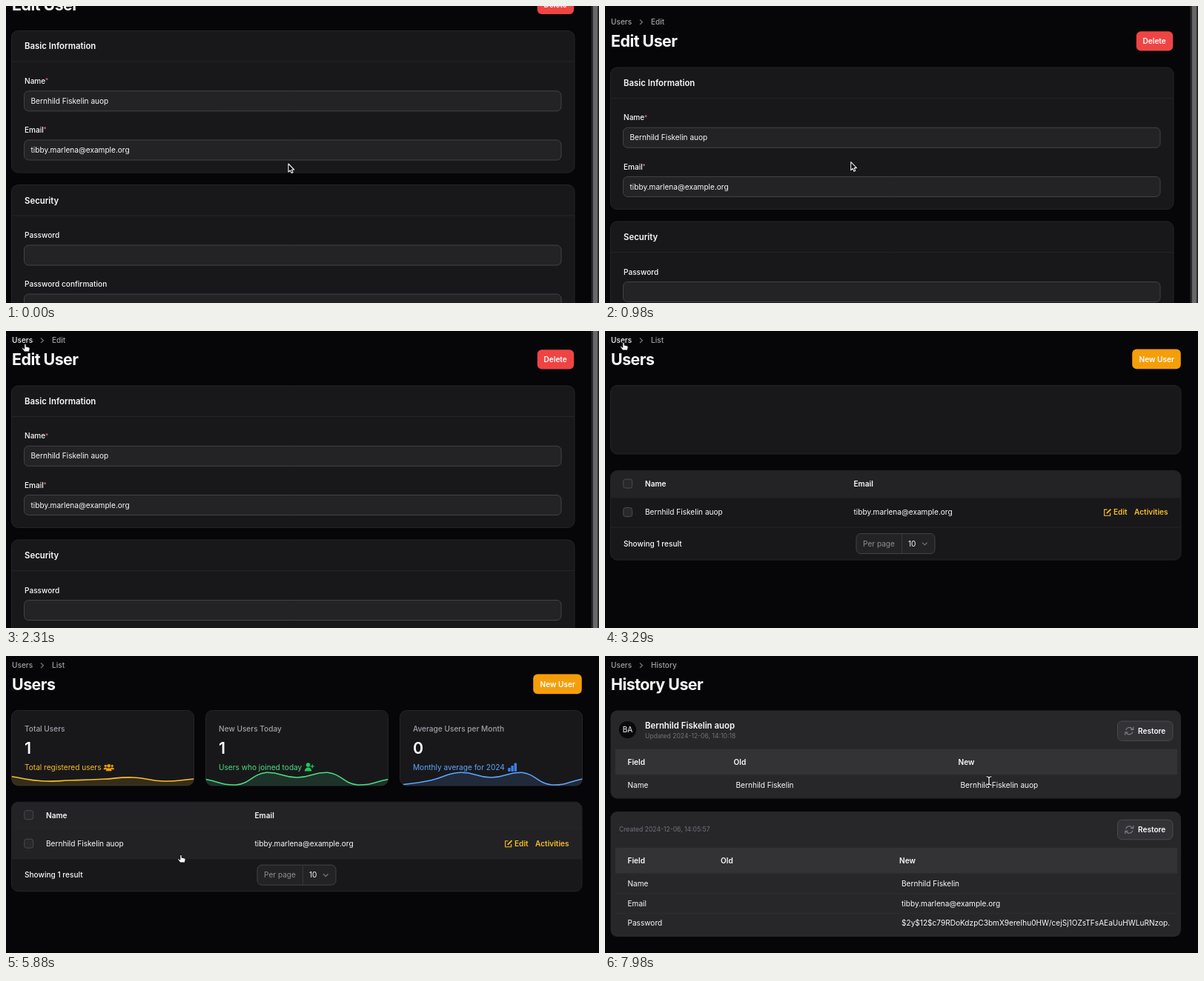
Write an HTML page with a canvas that moves like this. It is 800 px wide and 401 px high and loops after 8 s.

```html
<!DOCTYPE html>
<html lang="en">
<head>
<meta charset="utf-8">
<title>User admin</title>
<style>
html, body { margin: 0; height: 100%; overflow: hidden; background: #060608; }
canvas { display: block; width: 800px; height: 401px; }
</style>
</head>
<body>
<canvas id="stage"></canvas>
<script>
const LOOP = 8000, STEP = 70;
const LIST_AT = 3290, STATS_AT = 3360, HISTORY_AT = 7490;
const FULL = 'Bernhild Fiskelin auop', SHORT = 'Bernhild Fiskelin';
const MAIL = 'tibby.marlena@example.org';
const HASH = '$2y$12$c79RDoKdzpC3bmX9ereIhu0HW/cejSj1OZsTFsAEaUuHWLuRNzop.';
const WHITE = '#fafafa', MUTED = '#a1a1aa', DIM = '#71717a', AMBER = '#fbbf24';
const BG = '#060608', CARD = '#18181b', RAISED = '#232326', EDGE = '#252529';

const canvas = document.getElementById('stage');
const c = canvas.getContext('2d');
const dpr = window.devicePixelRatio || 1;
canvas.width = 800 * dpr;
canvas.height = 401 * dpr;

const smooth = u => u * u * (3 - 2 * u);
const easeOut = u => 1 - (1 - u) ** 4;
const clamp = (v, lo, hi) => Math.min(hi, Math.max(lo, v));

// Interpolates rows of [time, ...values]
function track(keys, t) {
  const i = keys.findIndex(k => k[0] > t);
  if (i < 0) return keys[keys.length - 1].slice(1);
  const a = keys[i - 1], b = keys[i];
  const u = smooth((t - a[0]) / (b[0] - a[0]));
  return a.slice(1).map((v, n) => v + (b[n + 1] - v) * u);
}

const POINTER = [
  [0, 381, 213], [490, 381, 213], [700, 376, 224], [1190, 303, 202], [1330, 300, 200],
  [1470, 300, 200], [2310, 26, 17], [2380, 25, 16], [2520, 25, 16], [2800, 27, 17],
  [2940, 25, 15], [4060, 25, 15], [4550, 556, 278], [4900, 600, 284], [5180, 604, 283],
  [5880, 236, 268], [6020, 230, 264], [6510, 245, 260], [6580, 245, 260],
  [7350, 736, 253], [7420, 736, 253], [7980, 518, 168.5]
];
const SCROLL = [
  [0, -40.5], [350, -36], [490, -36], [700, 22.5], [1190, 0.2], [1330, 0]
];

function text(s, x, y, color = WHITE, weight = 400, size = 10.1, spacing = 0) {
  c.font = `${weight} ${size}px Inter, sans-serif`;
  c.letterSpacing = spacing + 'px';
  c.fillStyle = color;
  c.fillText(s, x, y + size * 0.364);
}

function box(x0, y0, x1, y1, r, fill, stroke) {
  c.beginPath();
  c.roundRect(x0, y0, x1 - x0, y1 - y0, r);
  if (fill) { c.fillStyle = fill; c.fill(); }
  if (stroke) { c.strokeStyle = stroke; c.lineWidth = 1; c.stroke(); }
}

function line(points, color, width = 1) {
  c.beginPath();
  points.forEach(p => c.lineTo(...p));
  c.strokeStyle = color;
  c.lineWidth = width;
  c.stroke();
}

function disc(x, y, r, color) {
  c.beginPath();
  c.arc(x, y, r, 0, 7);
  c.fillStyle = color;
  c.fill();
}

const rule = (x0, x1, y) => line([[x0, y], [x1, y]], EDGE);

function heading(crumb, title, hot) {
  text('Users', 8, 12.3, hot ? '#f4f4f5' : MUTED, 500);
  line([[47, 9.5], [50.5, 12.8], [47, 16]], DIM, 1.3);
  text(crumb, 62, 12.3, MUTED, 500);
  text(title, 8, 38.5, WHITE, 700, 21.4, -0.53);
}

function field(label, y, value, star) {
  text(label, 25, y, WHITE, 500);
  if (star) text('*', star, y - 1, '#f87171', 500, 8);
  box(24.5, y + 13.5, 749, y + 40.5, 6, RAISED, '#434348');
  if (value) text(value, 33.5, y + 27);
}

function editPage(offset, hot) {
  c.save();
  c.translate(0, offset);
  c.fillStyle = '#1f1f22';
  c.fillRect(0, -60, 800, 43.5);
  heading('Edit', 'Edit User', hot);
  box(716.8, 25.2, 766.2, 51.6, 6, '#ef4444');
  text('Delete', 725.5, 38.5, '#fff', 600);
  box(7.5, 74, 767, 265.5, 9, CARD, EDGE);
  text('Basic Information', 25, 94.8, WHITE, 600, 11.4);
  rule(8, 767, 115.5);
  field('Name', 141.8, FULL, 53);
  field('Email', 208, MAIL, 50.5);
  box(7.5, 282, 767, 500, 9, CARD, EDGE);
  text('Security', 25, 303, WHITE, 600, 11.4);
  rule(8, 767, 323.5);
  field('Password', 350);
  field('Password confirmation', 416);
  c.restore();
  c.fillStyle = '#2a2a2c';
  c.fillRect(789.5, 0, 10.5, 401);
  c.fillStyle = '#68686a';
  c.fillRect(792, 0, 6, 401);
}

// Smooth curve through evenly spaced heights, its handles kept inside the plot
function chart(x, heights, color, grow) {
  const gap = 41, base = 175;
  const p = heights.map((h, i) => [x + i * gap, base - h * grow]);
  const slope = i => {
    const a = Math.max(0, i - 1), b = Math.min(6, i + 1);
    return (p[b][1] - p[a][1]) / (b - a) / 2;
  };
  const handle = (i, side) => [
    p[i][0] + side * gap / 2,
    clamp(p[i][1] + side * slope(i), 157, 174.5)
  ];
  const trace = () => {
    for (let i = 0; i < 6; i++) c.bezierCurveTo(...handle(i, 1), ...handle(i + 1, -1), ...p[i + 1]);
  };
  c.save();
  c.beginPath();
  c.roundRect(x, 73.5, 246, 101.5, 9);
  c.clip();
  c.beginPath();
  c.moveTo(...p[0]);
  trace();
  c.strokeStyle = color;
  c.lineWidth = 1.6;
  c.stroke();
  c.lineTo(x + 246, base);
  c.lineTo(x, base);
  c.globalAlpha = 0.13;
  c.fillStyle = color;
  c.fill();
  c.restore();
}

function person(x, y, k, color) {
  disc(x, y - 3 * k, 2.5 * k, color);
  c.beginPath();
  c.ellipse(x, y + 4.6 * k, 4.2 * k, 4.4 * k, 0, Math.PI, 0);
  c.fill();
}

const STATS = [
  ['Total Users', '1', 'Total registered users', AMBER, [12.2, 6.3, 7.2, 8.7, 11, 6, 9], () => {
    person(134.3, 150.3, 0.65, '#f59e0b');
    person(143.1, 150.3, 0.65, '#f59e0b');
    person(138.7, 151, 1.1, CARD);
    person(138.7, 151, 0.92, '#f59e0b');
  }],
  ['New Users Today', '1', 'Users who joined today', '#4ade80', [8.5, 1, 17.7, 11, 17.7, 1, 8.5], () => {
    person(407.6, 150.3, 1.12, '#22c55e');
    line([[410.8, 149], [415.8, 149]], '#22c55e', 1.2);
    line([[413.3, 146.5], [413.3, 151.5]], '#22c55e', 1.2);
  }],
  ['Average Users per Month', '0', 'Monthly average for 2024', '#60a5fa', [0.7, 7, 17.7, 11, 17.7, 1, 9], () => {
    [5, 8, 11.5].forEach((h, i) => box(677.2 + i * 4.2, 156 - h, 680.6 + i * 4.2, 156, 1, '#3b82f6'));
  }]
];

function stats(grow) {
  STATS.forEach(([label, value, note, color, heights, icon], i) => {
    const x = 7.5 + i * 262;
    box(x, 73.5, x + 246, 175, 9, CARD, EDGE);
    text(label, x + 17.5, 98.3, MUTED, 500);
    text(value, x + 17.5, 124.4, WHITE, 600, 21.4, -0.5);
    text(note, x + 17.5, 150.2, color);
    chart(x, heights, color, grow);
    icon();
  });
}

function editIcon(y) {
  line([[677.5, y - 3.5], [673.6, y - 3.5], [673.6, y + 4.6], [681.6, y + 4.6], [681.6, y + 0.8]], AMBER, 1.1);
  line([[676.8, y + 1.6], [682.4, y - 4]], AMBER, 1.8);
}

function listTable(y, hover) {
  box(7.5, y, 777, y + 120.5, 9, CARD, EDGE);
  box(8, y + 0.5, 776.5, y + 36, [8, 8, 0, 0], RAISED);
  if (hover) box(8, y + 36, 776.5, y + 76.5, 0, '#222225');
  rule(8, 776.5, y + 36.5);
  rule(8, 776.5, y + 76.5);
  for (const d of [17.5, 56]) box(24.7, y + d - 6, 36.7, y + d + 6, 3, '#29292c', '#4b4b50');
  text('Name', 54, y + 17.8, WHITE, 600);
  text('Email', 335.5, y + 17.8, WHITE, 600);
  text(FULL, 54, y + 56);
  text(MAIL, 335.5, y + 56);
  editIcon(y + 56);
  text('Edit', 686, y + 56, AMBER, 600);
  text('Activities', 714, y + 56, AMBER, 600);
  text('Showing 1 result', 25, y + 98.5, WHITE, 500);
  box(339, y + 85, 445, y + 112, 6, RAISED, '#434348');
  line([[400.5, y + 85], [400.5, y + 112]], '#38383c');
  text('Per page', 348, y + 98.5, '#8d8d95');
  text('10', 409, y + 98.5);
  line([[428, y + 97], [431.3, y + 100.3], [434.6, y + 97]], DIM, 1.3);
}

function listPage(t, hot, hover) {
  heading('List', 'Users', hot);
  box(711.2, 24.6, 776.8, 51.2, 6, '#f59e0b');
  text('New User', 720.5, 38, '#fff', 600);
  const loaded = t >= STATS_AT;
  if (loaded) stats(easeOut(Math.min(1, (t - STATS_AT + STEP) / 630)));
  else box(7.5, 73.5, 777, 166, 9, CARD, EDGE);
  listTable(loaded ? 197.2 : 188.6, hover);
}

function restoreButton(y) {
  box(691.5, y - 13.2, 766, y + 13.2, 6, '#333337', '#4a4a4e');
  c.strokeStyle = '#85858c';
  c.lineWidth = 1.1;
  for (const a of [3.4, 6.54]) {
    c.beginPath();
    c.arc(707.3, y, 4.7, a, a + 2.4);
    c.stroke();
  }
  line([[709, y - 1.8], [712.8, y - 1.8], [712.8, y - 5.5]], '#85858c', 1.1);
  line([[705.6, y + 1.8], [701.8, y + 1.8], [701.8, y + 5.5]], '#85858c', 1.1);
  text('Restore', 719, y, WHITE, 600);
}

function changes(y, oldX, newX, rows) {
  box(14, y - 17.3, 772, y + 17.3, 0, '#333336');
  [['Field', 30.5], ['Old', oldX], ['New', newX]].forEach(([s, x]) => text(s, x, y, WHITE, 600));
  rows.forEach(([name, before, after], i) => {
    const ry = y + 31.2 + i * 26.6;
    text(name, 30.5, ry);
    text(before, oldX + 3, ry);
    text(after, newX + 3, ry);
    if (i) line([[14, ry - 13.3], [772, ry - 13.3]], '#2f2f33');
  });
}

function historyPage() {
  heading('History', 'History User');
  box(7.5, 73.5, 777, 192.5, 9, '#27272a');
  disc(30.5, 99.5, 11.6, '#09090b');
  text('BA', 23.7, 99.8);
  text(FULL, 54, 94, WHITE, 600, 11.4);
  text('Updated 2024-12-06, 14:10:18', 54, 108.3, DIM, 400, 8.6);
  restoreButton(101.2);
  changes(143, 173.5, 476.5, [['Name', SHORT, FULL]]);
  box(7.5, 210, 777, 379, 9, '#27272a');
  text('Created 2024-12-06, 14:05:57', 19, 234.3, DIM, 400, 8.6);
  restoreButton(234.5);
  changes(276.2, 156, 397, [['Name', '', SHORT], ['Email', '', MAIL], ['Password', '', HASH]]);
}

const ARROW = new Path2D('M0 0V11L2.5 8.8 4.2 12.5 6.1 11.7 4.4 8H7.7Z');
const HAND = new Path2D('M-1.3 1Q0-.8 1.2 1V4L5.2 5Q6.4 5.4 6.2 7L5.4 11H-1.2L-4.4 6.8Q-4.6 5-2.9 5.6L-1.3 7Z');
const IBEAM = new Path2D('M-3.4-5.6Q0-5.6 0-3.6Q0-5.6 3.4-5.6M0-3.6V3.6M-3.4 5.6Q0 5.6 0 3.6Q0 5.6 3.4 5.6');

function pointer(kind, x, y) {
  c.save();
  c.translate(x, y);
  c.lineJoin = 'round';
  if (kind === IBEAM) {
    c.strokeStyle = '#000';
    c.lineWidth = 3;
    c.stroke(kind);
    c.strokeStyle = '#eee';
    c.lineWidth = 1.4;
    c.stroke(kind);
  } else {
    const hand = kind === HAND;
    c.strokeStyle = hand ? '#111' : '#f4f4f4';
    c.lineWidth = 1.1;
    c.fillStyle = hand ? '#f4f4f4' : '#000';
    c.fill(kind);
    c.stroke(kind);
  }
  c.restore();
}

function draw(now) {
  const t = Math.floor(now % LOOP / STEP) * STEP;
  const [x, y] = track(POINTER, t);
  const within = (x0, y0, x1, y1) => x >= x0 && x <= x1 && y >= y0 && y <= y1;
  const hot = within(8, 5, 37, 20);
  let kind = hot ? HAND : ARROW;

  c.setTransform(dpr, 0, 0, dpr, 0, 0);
  c.fillStyle = BG;
  c.fillRect(0, 0, 800, 401);
  if (t < LIST_AT) {
    const [offset] = track(SCROLL, t);
    editPage(offset, hot);
    if ([155, 222].some(top => within(25, top + offset, 749, top + offset + 27))) kind = IBEAM;
  } else if (t < HISTORY_AT) {
    const hover = within(8, 234, 777, 273);
    listPage(t, hot, hover);
    if (hover) kind = HAND;
  } else {
    historyPage();
    if (within(479, 164, 586, 184)) kind = IBEAM;
  }
  pointer(kind, x, y);
}

const start = performance.now();
function tick() {
  draw(performance.now() - start);
  requestAnimationFrame(tick);
}
tick();
</script>
</body>
</html>
```
